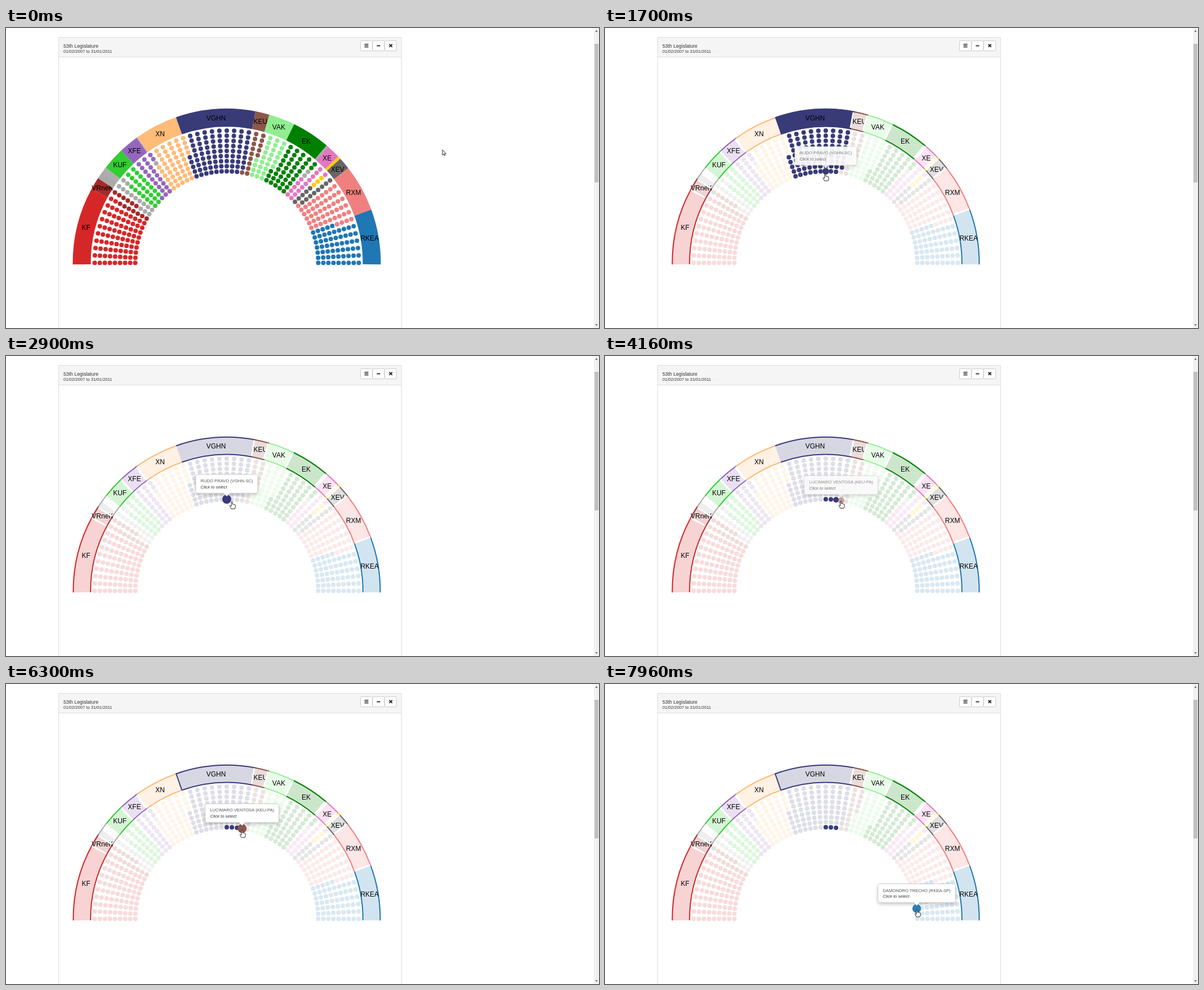
Write an HTML page with a canvas that moves like this. It is 1053x532 px and loops after 8 s.

```html
<!DOCTYPE html>
<html lang="en">
<head>
<meta charset="utf-8">
<title>Legislature seats</title>
<style>
html, body { margin: 0; width: 100%; height: 100%; overflow: hidden; background: #fff; }
canvas { display: block; }
</style>
</head>
<body>
<canvas id="stage" width="1053" height="532"></canvas>
<script>
const ctx = document.getElementById('stage').getContext('2d');
const LOOP = 8000, CX = 392, CY = 416.5, R0 = 241.5, R1 = 273.5;
const FONT = 'Arial, "Liberation Sans", sans-serif';
const FADED = 0.17, MAIN = 'VGHN';

// label, colour, index of the first seat
const parties = [
  ['KF', '#d62728', 0], ['VRneK', '#a52a2a', 83],
  ['', '#aaa', 96], ['', '#aaa', 104], ['', '#aaa', 106], ['', '#aaa', 108],
  ['KUF', '#32cd32', 110], ['XFE', '#9467bd', 134], ['', '#aaa', 155],
  ['XN', '#ffbb78', 156], [MAIN, '#393b79', 202], ['KEU', '#8c564b', 287],
  ['VAK', '#90ee90', 302], ['EK', '#008000', 330], ['', '#aaa', 371],
  ['XE', '#e377c2', 373], ['', '#ffcc00', 388], ['XEV', '#666', 391],
  ['RXM', '#f08080', 404], ['RKEA', '#1f77b4', 454]
].map(([label, color, from], i, all) => ({ label, color, from, to: i + 1 < all.length ? all[i + 1][2] : 513 }));

// inner-row seats under the pointer: column, start, end, tooltip
const hovers = [
  [28, 1530, 2930, 'RUDO PRAVO (VGHN-SC)'],
  [29, 2960, 3440, 'ALMIR GODEZ (VGHN-RJ)'],
  [30, 3440, 4060, 'VALDENO CRISTAL (VGHN-MG)'],
  [31, 3995, 4600, 'LUCIMARO VENTOSA (KEU-PA)'],
  [31, 5600, 6340, 'LUCIMARO VENTOSA (KEU-PA)'],
  [53, 7010, 7700, 'AURELIO MARCOS BRANDES TELMO (RKEA-SP)'],
  [54, 7720, 9000, 'DAMONDRO TRECHO (RKEA-SP)']
];
// column, selected from, until
const picks = [[28, 2400, 9000], [29, 3200, 9000], [30, 3750, 9000], [31, 4400, 6050]];

const path = [
  [500, 398, 156], [1300, 398, 160], [1640, 391, 258], [2160, 391, 258], [2360, 393, 258],
  [2500, 393, 258], [2860, 401, 258], [3160, 402, 258], [3360, 402, 258], [3560, 410, 258],
  [3900, 412, 258], [3960, 418, 257], [4160, 419, 257], [4500, 419, 257], [4760, 419, 295],
  [5000, 420, 299], [5430, 418, 283], [5700, 419, 258], [6300, 419, 259], [6700, 490, 325],
  [7100, 555, 392], [7400, 555, 396], [7830, 554, 398], [7960, 554, 400]
];
const arrowTimes = [[0, 500], [4580, 5600], [6380, 7020]];

const arrowShape = new Path2D('M0 0V9.2L2 7.4 3.4 10.4 4.8 9.8 3.5 6.9H6.3Z');
const handShape = new Path2D('M-1 .8Q0-.5 1 .8V5Q2 4 3 5.2 4 4.6 4.8 5.8 6 5.4 6.2 7V9.5L5 13H-1.2L-3.6 8.5Q-3.8 7-2.3 7.4L-1 8.6Z');

const clamp = v => Math.max(0, Math.min(1, v));
const ramp = (t, a, b) => clamp((t - a) / (b - a));
const mix = (a, b, k) => a + (b - a) * k;
const edgeAngle = seat => Math.PI + (seat / 513 * 181.2 - 0.6) * Math.PI / 180;
const at = (r, a) => [CX + r * Math.cos(a), CY + r * Math.sin(a)];
const seatAt = (col, row) => at(234.5 - 9 * row, Math.PI * (1 + col / 56));

function text(s, x, y, size, color = '#333', style = '') {
  ctx.font = `${style} ${size}px ${FONT}`;
  ctx.fillStyle = color;
  ctx.fillText(s, x, y);
}

function box(x, y, w, h, r, fill, stroke) {
  ctx.beginPath();
  ctx.roundRect(x, y, w, h, r);
  ctx.fillStyle = fill;
  ctx.fill();
  if (stroke) { ctx.strokeStyle = stroke; ctx.stroke(); }
}

function poly(points, color) {
  ctx.beginPath();
  points.forEach(p => ctx.lineTo(...p));
  ctx.fillStyle = color;
  ctx.fill();
}

function line(x1, y1, x2, y2, color, width) {
  ctx.beginPath();
  ctx.moveTo(x1, y1);
  ctx.lineTo(x2, y2);
  ctx.strokeStyle = color;
  ctx.lineWidth = width;
  ctx.stroke();
}

function drawPage() {
  ctx.fillStyle = '#fff';
  ctx.fillRect(0, 0, 1053, 532);
  ctx.lineWidth = 1;
  box(93.5, 16.5, 609, 540, 2, '#fff', '#ddd');
  box(93.5, 16.5, 609, 35, [2, 2, 0, 0], '#f5f5f5', '#ddd');
  text('53th Legislature', 102, 34.5, 8.72);
  text('01/02/2007 to 31/01/2011', 102, 44.2, 7.63);
  for (const x of [629.5, 651, 672.5]) box(x, 22.5, 21, 18, 2, '#fff', '#ccc');
  for (const y of [28.7, 31.2, 33.7]) line(636.5, y, 643.5, y, '#333', 1.4);
  line(658.5, 31.5, 664.5, 31.5, '#333', 2);
  line(680.7, 28.7, 685.8, 33.8, '#333', 2);
  line(685.8, 28.7, 680.7, 33.8, '#333', 2);

  ctx.fillStyle = '#f1f1f1';
  ctx.fillRect(1044, 0, 9, 532);
  ctx.fillStyle = '#c1c1c1';
  ctx.fillRect(1045, 28, 7, 246);
  poly([[1046.2, 6.5], [1048.5, 4], [1050.8, 6.5]], '#505050');
  poly([[1046.2, 525.5], [1048.5, 528], [1050.8, 525.5]], '#505050');
}

function drawArc(p, level, dimmed, outlined) {
  const a = edgeAngle(p.from), b = edgeAngle(p.to);
  const main = p.label === MAIN;
  if (dimmed && p.from && !main) {
    // white gap just before the sector
    const back = 1.5 / 257;
    line(...at(R0 + 2, a - back), ...at(R1 - 2, a - back), '#fff', 3);
  }
  ctx.beginPath();
  ctx.arc(CX, CY, R1, a, b);
  ctx.arc(CX, CY, R0, b, a, true);
  ctx.closePath();
  ctx.globalAlpha = level;
  ctx.fillStyle = p.color;
  ctx.fill();
  ctx.globalAlpha = 1;
  if (dimmed) {
    ctx.strokeStyle = p.color;
    ctx.lineWidth = 2;
    for (const r of [R0 + 0.3, R1 - 1]) {
      ctx.beginPath();
      ctx.arc(CX, CY, r, a, b);
      ctx.stroke();
    }
    if (main && outlined) line(...at(R0, a), ...at(R1, a), p.color, 2);
  }
  const [x, y] = at(257.5, (a + b) / 2);
  ctx.textAlign = 'center';
  text(p.label, x, y + 4.3, 12, '#000');
  ctx.textAlign = 'left';
}

function focusOf(col, t) {
  let k = 0;
  for (const [c, a, b] of hovers)
    if (c === col) k = Math.max(k, Math.min(ramp(t, a, a + 250), 1 - ramp(t, b, b + 200)));
  return k * k;
}

function pickedLevel(col, t) {
  const pick = picks.find(p => p[0] === col);
  return pick ? Math.min(ramp(t, pick[1], pick[1] + 100), 1 - ramp(t, pick[2], pick[2] + 300)) : 0;
}

function drawSeat(seat, color, level, t) {
  const col = Math.floor(seat / 9), row = seat % 9;
  let radius = 4;
  if (row === 8) {
    const focus = focusOf(col, t);
    radius += 4 * focus;
    level = mix(level, 1, Math.max(focus, pickedLevel(col, t)));
  }
  ctx.globalAlpha = level;
  ctx.beginPath();
  ctx.arc(...seatAt(col, row), radius, 0, 7);
  ctx.fillStyle = color;
  ctx.fill();
  ctx.globalAlpha = 1;
}

function drawTooltip([col, a, b, name], t) {
  const alpha = Math.min(ramp(t, a + 100, a + 200), 1 - ramp(t, b, b + 100));
  if (alpha <= 0) return;
  const [x, y] = seatAt(col, 8);
  ctx.font = `7.63px ${FONT}`;
  const w = ctx.measureText(name).width + 17, left = x - w / 2, top = y - 43.8;
  ctx.globalAlpha = alpha;
  ctx.lineWidth = 0.8;
  ctx.shadowColor = 'rgba(0,0,0,.25)';
  ctx.shadowBlur = 6;
  ctx.shadowOffsetY = 2.5;
  box(left, top, w, 33, 3, '#fff');
  ctx.shadowColor = 'transparent';
  box(left, top, w, 33, 3, '#fff', '#c8c8c8');
  poly([[x - 6, top + 33], [x + 6, top + 33], [x, top + 39]], '#bbb');
  poly([[x - 5.5, top + 32.5], [x + 5.5, top + 32.5], [x, top + 38]], '#fff');
  text(name, left + 8.5, top + 14, 7.63, '#555');
  text('Click to select', left + 8.5, top + 24.8, 7.63, '#333', 'italic');
  ctx.globalAlpha = 1;
}

function pointer(t) {
  if (t < 500) return [775, 216];
  const i = path.findIndex(p => p[0] > t);
  if (i < 0) return path[path.length - 1].slice(1);
  const [t0, x0, y0] = path[i - 1], [t1, x1, y1] = path[i];
  const k = ramp(t, t0, t1);
  return [mix(x0, x1, k), mix(y0, y1, k)];
}

function drawPointer(t) {
  const shape = arrowTimes.some(([a, b]) => t >= a && t < b) ? arrowShape : handShape;
  ctx.save();
  ctx.translate(...pointer(t));
  ctx.fillStyle = '#fff';
  ctx.fill(shape);
  ctx.strokeStyle = '#111';
  ctx.lineWidth = 0.9;
  ctx.lineJoin = 'round';
  ctx.stroke(shape);
  ctx.restore();
}

function draw(t) {
  const dimmed = t >= 1100;
  const dim = t < 500 ? 0 : dimmed ? 1 : 0.06;
  const mainDim = ramp(t, 2500, 2860);
  const dimOf = p => p.label === MAIN ? mainDim : dim;
  drawPage();
  for (const p of parties) drawArc(p, mix(1, 0.2, dimOf(p)), dimmed, t >= 4600);
  for (const p of parties)
    for (let s = p.from; s < p.to; s++) drawSeat(s, p.color, mix(1, FADED, dimOf(p)), t);
  for (const h of hovers) drawTooltip(h, t);
  drawPointer(t);
}

const start = performance.now();
function tick() {
  draw((performance.now() - start) % LOOP);
  requestAnimationFrame(tick);
}
tick();
</script>
</body>
</html>
```
